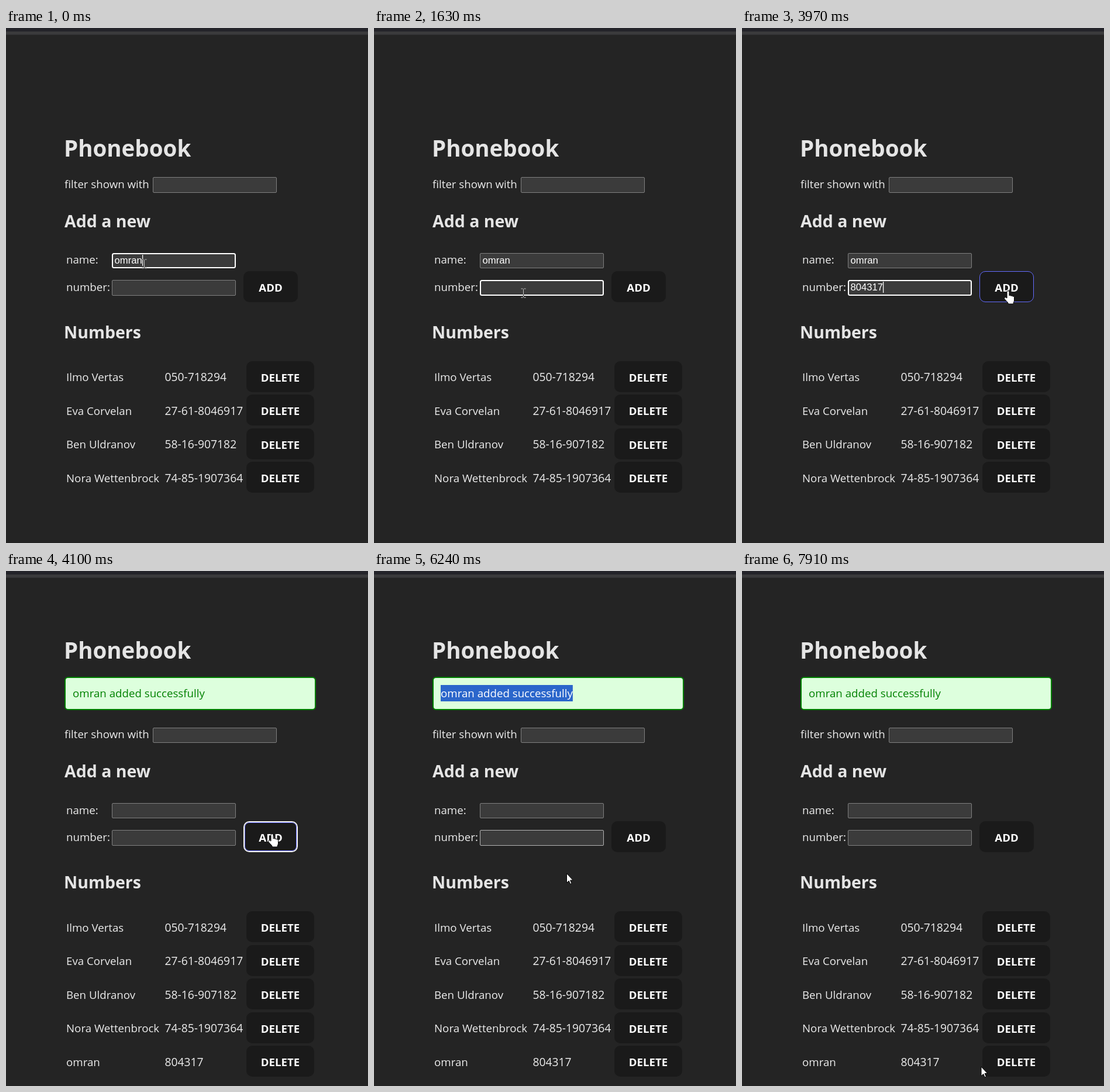
These frames come from a looping animation (619x881 px, 8000 ms). An HTML page:

```html
<!DOCTYPE html>
<html lang="en">
<head>
<meta charset="utf-8">
<title>Phonebook</title>
<style>
html, body { margin: 0; width: 100%; height: 100%; overflow: hidden; background: #242424; }
svg { display: block; width: 619px; height: 881px; isolation: isolate; }
text { font: 18.7px "Open Sans", "Noto Sans", sans-serif; white-space: pre; }
.h1, .h2 { font-weight: 700; fill: #e5e5e5; }
.h1 { font-size: 38.5px; }
.h2 { font-size: 28.5px; }
.num { font-size: 19.3px; }
.btn { font-weight: 700; font-size: 18.6px; text-anchor: middle; }
.typed { font: 16.67px "Liberation Sans", Arial, sans-serif; }
.ibeam { fill: none; stroke: #fff; mix-blend-mode: difference; }
.pointer { fill: #fff; stroke: #000; stroke-linejoin: round; }
</style>
</head>
<body>
<svg id="stage" viewBox="0 0 619 881"></svg>
<script>
const LOOP = 8000, SUBMIT = 4100;
const NAME = 'omran', NUMBER = '804317', NOTE = NAME + ' added successfully';
const PEOPLE = [
  ['Ilmo Vertas', '050-718294'],
  ['Eva Corvelan', '27-61-8046917'],
  ['Ben Uldranov', '58-16-907182'],
  ['Nora Wettenbrock', '74-85-1907364']
];

// [time, shape, x, y]: the I-beam is placed by its centre, the others by their corner
const CURSOR = [
  [0, 'ibeam', 236, 403], [560, 'ibeam', 248, 440], [680, 'arrow', 254, 471],
  [830, 'ibeam', 190, 412], [980, 'ibeam', 108, 441], [1100, 'ibeam', 238, 448],
  [1220, 'ibeam', 255, 453], [3520, 'ibeam', 290, 453], [3670, 'arrow', 400, 449],
  [3820, 'hand', 445, 449], [3970, 'hand', 448, 449], [4660, 'arrow', 313, 339],
  [4810, 'arrow', 170, 235], [4930, 'arrow', 105, 202], [5080, 'arrow', 103, 201],
  [5230, 'ibeam', 115, 209], [5350, 'ibeam', 133, 209], [5470, 'ibeam', 158, 209],
  [5590, 'ibeam', 188, 209], [5740, 'arrow', 394, 204], [6110, 'arrow', 381, 300],
  [6240, 'arrow', 329, 517], [6380, 'arrow', 249, 714], [6520, 'arrow', 165, 780],
  [6640, 'ibeam', 116, 826], [6920, 'ibeam', 118, 831], [7420, 'ibeam', 148, 841],
  [7540, 'arrow', 220, 846], [7670, 'arrow', 310, 847], [7790, 'arrow', 385, 847],
  [7910, 'arrow', 408.5, 847.5]
];
const TYPED = [[0, 0], [1880, 1], [2000, 2], [2140, 3], [2540, 4], [2820, 5], [2940, 6]];
const SELECTED = [[0, 0], [5350, 2], [5470, 5], [5590, 8], [5740, NOTE.length], [6790, 0]];
const FOCUS = [[0, 'name'], [1100, 'number'], [SUBMIT, 'add'], [5230, '']];
const CARET = [[0, 1], [410, 0], [980, 1], [1630, 0], [1880, 1], [3520, 0], [3970, 1], [SUBMIT, 0]];

const SHAPES = {
  ibeam: 'M-4 -7.5H-1M1 -7.5H4M0 -7V7M-4 7.5H-1M1 7.5H4',
  arrow: 'M.5 .5V16.5L4.2 13L6.7 18.5L9 17.5L6.6 12H11.3Z',
  hand: 'M5 13V2.5a2 2 0 0 1 4 0V9a1.7 1.7 0 0 1 3 .6a1.7 1.7 0 0 1 3 .8a1.5 1.5 0 0 1 2.5 1.2V17' +
        'c0 2-1.5 3-1.5 6H7.5C7 20 3.5 18 1 14.5a1.7 1.7 0 0 1 2.5-2.3z'
};

const stage = document.getElementById('stage');
const ruler = document.createElement('canvas').getContext('2d');

const at = (table, t) => table.filter(row => row[0] <= t).pop();
const clamp = v => Math.min(1, Math.max(0, v));
const width = (str, font) => { ruler.font = font; return ruler.measureText(str).width; };
const typedWidth = str => width(str, '16.67px "Liberation Sans", Arial, sans-serif');
const noteWidth = str => width(str, '18.7px "Open Sans", "Noto Sans", sans-serif');

const text = (str, x, y, cls = '', extra = '') =>
  `<text x="${x}" y="${Math.floor(y)}" class="${cls}" ${extra}>${str}</text>`;
const rect = (x, y, w, h, r, fill, extra = '') =>
  `<rect x="${x}" y="${y}" width="${w}" height="${h}" rx="${r}" fill="${fill}" ${extra}/>`;
const frame = (x, y, w, h, r, color, line, fill = 'none', extra = '') =>
  rect(x + line / 2, y + line / 2, w - line, h - line, r, fill,
    `stroke="${color}" stroke-width="${line}" ${extra}`);

function field(x, top, h, focused, border = '#808080') {
  const y = Math.floor(top);
  return focused ? frame(x, y, 212, h, 2.5, '#fff', 2, '#3b3b3b')
                 : frame(x, y, 212, h, 1.5, border, 1, '#3b3b3b');
}

function button(label, x, top, w) {
  return rect(x, Math.floor(top), w, 53, 10, '#1a1a1a') +
    text(label, x + w / 2, top + 35, 'btn', 'fill="#fff"');
}

function addButton(t, dy, focused) {
  const y = Math.floor(416 + dy), inset = t >= SUBMIT ? 2 : 0;
  const hover = clamp((t - 3670) / 250) * clamp(1 - (t - 4560) / 250);
  let out = button('ADD', 406, 416 + dy, 93);
  if (hover > 0) {
    out += frame(406 + inset, y + inset, 93 - 2 * inset, 53 - 2 * inset, 9.5 - inset,
      '#646cff', 1, 'none', `opacity="${hover.toFixed(2)}"`);
  }
  if (focused) out += frame(406, y, 93, 53, 9, '#f4f4f4', 2);
  return out;
}

function notification(t) {
  const w = noteWidth(NOTE.slice(0, at(SELECTED, t)[1]));
  let out = frame(100, 181, 430, 57, 5, '#008000', 2, '#ddffdd') +
    text(NOTE, 114, 216, '', 'fill="#008000"');
  if (w) {
    out += `<clipPath id="sel">${rect(114, 195, w, 28, 0, '#000')}</clipPath>` +
      rect(114, 195, w, 28, 0, '#2b66cb') +
      text(NOTE, 114, 216, '', 'fill="#fff" clip-path="url(#sel)"');
  }
  return out;
}

function cursor(t) {
  const [, shape, x, y] = at(CURSOR, t);
  const cls = shape === 'ibeam' ? 'ibeam' : 'pointer';
  const nudge = shape === 'ibeam' ? .5 : 0;
  return `<path class="${cls}" transform="translate(${x + nudge} ${y + nudge})" d="${SHAPES[shape]}"/>`;
}

function scene(t) {
  const added = t >= SUBMIT, dy = added ? 12.5 : 0, focus = at(FOCUS, t)[1];
  const digits = NUMBER.slice(0, at(TYPED, t)[1]);
  const people = added ? [...PEOPLE, [NAME, NUMBER]] : PEOPLE;
  const numberBorder = t >= 6240 && t < 6380 ? '#b4b4b4' : undefined;

  let out = rect(0, 0, 619, 881, 0, '#242424') +
    rect(0, 0, 619, 6, 0, '#24242a') + rect(0, 6, 619, 5.5, 0, '#3a3a3c');
  out += '<g fill="#ececec">' +
    text('Phonebook', 99, added ? 150 : 220, 'h1') +
    text('filter shown with', 100, 274 + dy) +
    text('Add a new', 100, 341 + dy, 'h2') +
    text('name:', 103, 403.5 + dy) +
    text('number:', 103, 450 + dy) +
    text('Numbers', 99, 531 + dy, 'h2') +
    people.map(([name, number], i) => {
      const y = 604.5 + 57.5 * i + dy;
      return text(name, 103, y) + text(number, 271.5, y, 'num');
    }).join('') + '</g>';
  out += people.map((_, i) => button('DELETE', 411, 570 + 57.5 * i + dy, 116)).join('');
  out += field(251, 255.5 + dy, 27 - (added ? 1 : 0), false) +
    field(181, 385 + dy, 26, focus === 'name') +
    field(181, 431 + dy, 27, focus === 'number', numberBorder) +
    addButton(t, dy, focus === 'add');

  if (added) {
    out += notification(t);
  } else {
    out += text(NAME, 185.5, 403, 'typed', 'fill="#fff"') +
      text(digits, 185.5, 449, 'typed', 'fill="#fff"');
    if (at(CARET, t)[1]) {
      const onName = focus === 'name';
      const x = Math.round(185.5 + typedWidth(onName ? NAME : digits));
      out += rect(x, onName ? 388 : 434, 1.25, 19, 0, '#fff');
    }
  }
  return out + cursor(t);
}

let shown = '';
const start = performance.now();
function draw() {
  const next = scene((performance.now() - start) % LOOP);
  if (next !== shown) stage.innerHTML = shown = next;
  requestAnimationFrame(draw);
}
draw();
</script>
</body>
</html>
```
